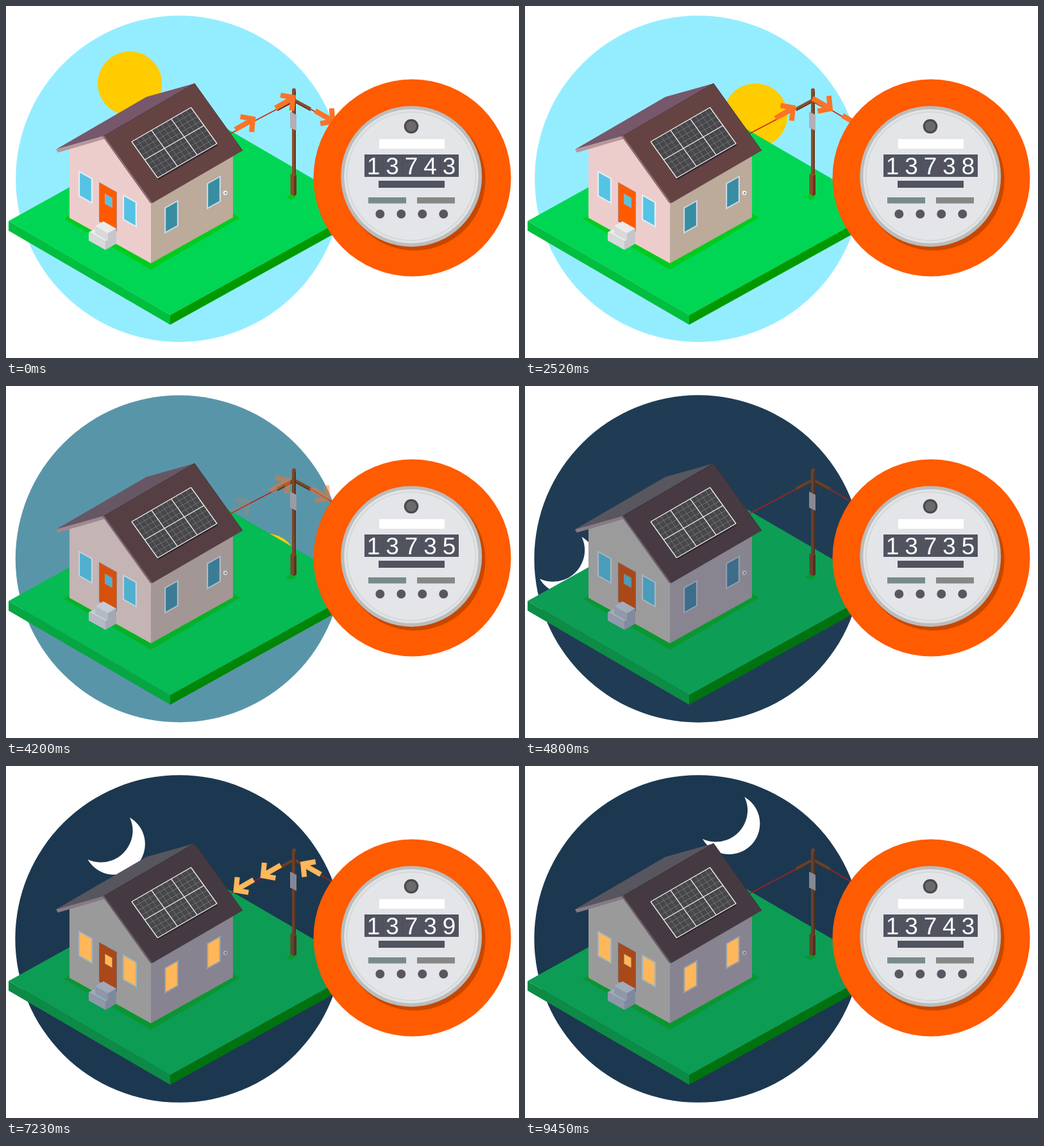
Write an HTML page with a canvas that moves like this. It is 800 by 550 pixels and loops after 9480 ms.

```html
<!DOCTYPE html>
<html lang="en">
<head>
<meta charset="utf-8">
<title>Solar home and meter</title>
<style>
html, body { margin: 0; width: 100%; height: 100%; overflow: hidden; background: #fff; }
canvas { display: block; width: 800px; height: 550px; }
</style>
</head>
<body>
<canvas id="stage" width="800" height="550"></canvas>
<script>
const ctx = document.getElementById('stage').getContext('2d');
const LOOP = 9480;
const RAD = Math.PI / 180;
const SLOPE = 0.56;            // fall of the slanted ground axes
let night = 0;
let lights = 0;

const clamp = v => Math.max(0, Math.min(1, v));
const ramp = (t, a, b) => clamp((t - a) / (b - a));
const mod = (a, b) => ((a % b) + b) % b;
const lerp = (a, b, k) => a + (b - a) * k;
const shift = ([x, y], dx, dy) => [x + dx, y + dy];

function mix(a, b, k) {
  const part = (h, i) => parseInt(h.slice(i, i + 2), 16);
  const rgb = [1, 3, 5].map(i => Math.round(lerp(part(a, i), part(b, i), k)));
  return '#' + rgb.map(v => v.toString(16).padStart(2, '0')).join('');
}
const tone = (day, dark) => mix(day, dark, night);

function trace(pts) {
  ctx.beginPath();
  pts.forEach(p => ctx.lineTo(...p));
}
function poly(color, ...pts) {
  trace(pts);
  ctx.fillStyle = color;
  ctx.fill();
}
function line(color, width, ...pts) {
  trace(pts);
  ctx.strokeStyle = color;
  ctx.lineWidth = width;
  ctx.stroke();
}
function disc(color, x, y, r) {
  ctx.beginPath();
  ctx.arc(x, y, r, 0, 7);
  ctx.fillStyle = color;
  ctx.fill();
}
function rect(color, x, y, w, h) {
  ctx.fillStyle = color;
  ctx.fillRect(x, y, w, h);
}

// Flat diamond from its front corner: a runs to the right, b to the left.
function slab(color, x, y, a, b, ka = SLOPE, kb = SLOPE) {
  poly(color, [x, y], [x + a, y - ka * a], [x + a - b, y - ka * a - kb * b], [x - b, y - kb * b]);
}
// Upright panel from its top left corner, falling by k to the right.
function face(color, x, y, w, h, k) {
  poly(color, [x, y], [x + w, y + k * w], [x + w, y + k * w + h], [x, y + h]);
}
function box(colors, x, y, a, b, h, ka = SLOPE, kb = SLOPE) {
  slab(colors[0], x, y - h, a, b, ka, kb);
  face(colors[1], x - b, y - h - kb * b, b, h, kb);
  face(colors[2], x, y - h, a, h, -ka);
}
function pane(frame, glass, x, y, w, h, k, m = 2.2) {
  face(frame, x, y, w, h, k);
  face(glass, x + m, y + m * (1 + k), w - 2 * m, h - 2 * m, k);
}

function sun(t) {
  const a = (-13.57 + 0.02403 * t) * RAD;
  disc('#ffcc00', 233.4 + 172.2 * Math.sin(a), 288.4 - 172.2 * Math.cos(a), 50);
}

function moon(t) {
  const u = 9450 - t;
  const a = (7.6 - 0.016622 * u - 4.97e-7 * u * u) * RAD;
  const x = 288.3 + 227 * Math.sin(a);
  const y = 315 - 227 * Math.cos(a);
  const tip = 46.3;            // half the distance between the tips
  const near = 12.4;
  const far = 17;
  const axis = Math.PI / 4;
  const half = Math.atan2(tip, -near);
  const cut = Math.atan2(tip, far);
  const off = (near + far) * Math.SQRT1_2;
  ctx.beginPath();
  ctx.arc(x, y, Math.hypot(tip, near), axis - half, axis + half);
  ctx.arc(x - off, y - off, Math.hypot(tip, far), axis + cut, axis - cut, true);
  ctx.fillStyle = '#ffffff';
  ctx.fill();
}

function ground() {
  const colors = [tone('#00d654', '#0d9c54'), tone('#00bf3e', '#0d8b46'), tone('#009a00', '#007210')];
  box(colors, 256, 498, 301, 252, 15, 0.556, 0.583);
  const shade = tone('#02cb1e', '#0a9630');
  slab(shade, 226, 412, 139, 136, 0.585, 0.585);
  slab(shade, 445, 303, 8, 8);
}

function power() {
  const wire = tone('#c9251c', '#a32020');
  const wood = tone('#8a4d2b', '#68412b');
  const dark = tone('#653719', '#4d3122');
  for (const side of [-1, 1]) {
    const top = [449, 147];
    const end = shift(top, 26 * side, 14);
    line(wire, 1.6, end, shift(end, 74 * side, side < 0 ? 39 : 44));
    line(wood, 5, top, end);
    line(dark, 1.5, shift(top, 0, 2.5), shift(end, 0, 2.5));
  }
  rect(wood, 446, 131, 6, 164);
  rect(dark, 450, 131, 2, 164);
  disc(wood, 449, 131.5, 3);
  box([wood, wood, dark], 449, 297, 4, 5.5, 31);
  face(tone('#b0b0b6', '#858894'), 443, 165, 10, 25, 0.5);
}

function solar() {
  const at = (u, v) => [196 + 92.5 * u + 40.5 * v, 212 - 53.5 * u + 56.5 * v];
  const grid = (color, width, cols, rows) => {
    for (let i = 0; i <= cols; i++) line(color, width, at(i / cols, 0), at(i / cols, 1));
    for (let i = 0; i <= rows; i++) line(color, width, at(0, i / rows), at(1, i / rows));
  };
  poly('#33262f', at(0, 1), at(1, 1), shift(at(1, 1), 1, 3), shift(at(0, 1), 1, 3));
  poly('#47464a', at(0, 0), at(1, 0), at(1, 1), at(0, 1));
  grid('#858585', 0.7, 12, 8);
  grid('#eeeeee', 1.3, 3, 2);
}

function roof() {
  const eave = [78, 224];
  const peak = [153, 203];
  const low = [228, 308];
  const back = p => shift(p, 141, -82);
  poly(tone('#77576a', '#57565e'), eave, peak, back(peak), back(eave));
  poly(tone('#b8979b', '#877987'), eave, peak, shift(peak, 0, 5), shift(eave, 3, 5));
  poly(tone('#8d6a72', '#6d5d6b'), shift(peak, -3, 0), peak, low, shift(low, -3, 0));
  poly(tone('#654343', '#463a42'), peak, back(peak), back(low), low);
  line(tone('#4f343a', '#393039'), 1, peak, back(peak), back(low));
}

function house() {
  const wall = tone('#edcdcc', '#9a9a9b');
  face(wall, 99, 219, 127, 112, SLOPE);
  poly(wall, [99, 220], [153, 203], [226, 304]);
  face(tone('#bcaa9a', '#878390'), 226, 306, 128, 96, -SLOPE);
  roof();
  solar();

  const glow = '#ffb759';
  const front = mix(tone('#55c3e3', '#4b9aba'), glow, lights);
  const side = mix(tone('#378da2', '#3e6b8a'), glow, lights);
  for (let i = 0; i < 2; i++) {
    pane(tone('#e4eff8', '#a3b4bf'), front, 113 + 69 * i, 257 + 37 * i, 22, 40, SLOPE);
    pane(tone('#ccd8e2', '#929eab'), side, 247 + 66 * i, 315 - 38 * i, 22, 41, -SLOPE);
  }
  pane(tone('#b7826c', '#766563'), tone('#ff5a00', '#a94818'), 145, 275, 28, 62, SLOPE, 1.2);
  pane(tone('#d99b7e', '#9c776a'), front, 154, 293, 12, 16, SLOPE, 0.7);

  const stone = [tone('#ebebeb', '#a2a9b9'), tone('#d9d9dc', '#8f98ab'), tone('#c6c6ca', '#7f899d')];
  box(stone, 155, 381, 17, 26, 13);
  box(stone, 159, 367, 13, 20, 12);
  disc(tone('#eeeeee', '#a5abb5'), 342, 292, 3.4);
  disc(tone('#777777', '#5b626d'), 342.6, 292.3, 1.3);
}

// s is the way along the wire, from the house over the pole to the meter.
function arrow(s, color, alpha, back) {
  const left = s < 112;
  const x = left ? 350 + s / 1.134 : 449 + (s - 112) / 1.154;
  const y = left ? 196 - s * 0.472 + (back ? 2 : 0) : 145 + (s - 112) * 0.5;
  ctx.save();
  ctx.globalAlpha = alpha;
  ctx.translate(x, y);
  ctx.scale(back ? -1 : 1, left !== back ? 1 : -1);
  ctx.beginPath();
  ctx.moveTo(-7, -11);
  ctx.lineTo(12.5, -7.5);
  ctx.lineTo(10.5, 13);
  ctx.moveTo(-15, 9);
  ctx.lineTo(11, -6);
  ctx.strokeStyle = color;
  ctx.lineWidth = 8;
  ctx.stroke();
  ctx.restore();
}

function flow(t) {
  const day = t < 4500;
  const fade = day ? 1 - ramp(t, 3900, 4500) : ramp(t, 4800, 5100) * (1 - ramp(t, 9000, 9300));
  const slow = 0.24 * ramp(t, 0, 1000) * (1 - ramp(t, 3650, 4200));
  const phase = day ? mod(25.5 + t * 0.0993, 71) : mod(36 - (t - 6000) * 0.0862, 71);
  for (let i = -1; i < 4; i++) {
    const s = phase + 71 * i;
    if (day) {
      arrow(s < 112 ? s : lerp(s, 112, slow), '#fb7327', fade * ramp(s, 14, 22), false);
    } else {
      arrow(s < 70 ? 24 + 46 * clamp(s / 70) ** 2.5 : s, '#ffb759', fade * ramp(s, -10, 0), true);
    }
  }
}

function reading(t) {
  return t < 4800 ? 13743 - Math.min(8, Math.floor(t / 480))
    : 13735 + Math.min(8, Math.floor((t - 4800) / 560));
}

function meter(t) {
  const slate = '#505461';
  disc('#ff5b00', 633.5, 268.5, 154);
  disc('#c64700', 637, 271.5, 110.5);
  disc('#bcbcbc', 632.2, 266.2, 110);
  disc('#d3d8d7', 632, 266, 105);
  disc('#e4e5e8', 632, 266, 104);
  disc('#d3d8d7', 632, 266, 101.5);
  disc('#e4e5e8', 632, 266, 99.5);

  disc('#4b4a50', 632, 188, 11.3);
  disc('#6b6969', 632, 188, 8);
  rect('#ffffff', 582, 208, 102, 15);
  rect(slate, 559, 232, 147, 35);
  rect(slate, 581, 273, 103, 11);
  rect('#788b8b', 565, 299, 59, 9.5);
  rect('#858885', 641, 299, 59, 9.5);
  for (let i = 0; i < 4; i++) {
    rect('#5b4b55', 587.5 + i * 29.8, 232, 1.2, 35);
    disc('#595561', 583.3 + i * 33, 325, 7);
  }
  ctx.fillStyle = '#ffffff';
  ctx.font = '37px "Liberation Sans", Arial, sans-serif';
  ctx.textAlign = 'center';
  [...String(reading(t))].forEach((d, i) => ctx.fillText(d, 573 + i * 29.5, 263));
}

function draw(t) {
  night = ramp(t, 3600, 4830);
  lights = ramp(t, 6450, 6800);
  rect('#ffffff', 0, 0, 800, 550);
  disc(tone('#94edff', '#1c3850'), 270.2, 270, 255 + 0.8 * night);
  if (t < 4900) sun(t);
  if (t > 4250) moon(t);
  ground();
  power();
  house();
  flow(t);
  meter(t);
}

const start = performance.now();
function tick() {
  draw((performance.now() - start) % LOOP);
  requestAnimationFrame(tick);
}
draw(0);
requestAnimationFrame(tick);
</script>
</body>
</html>
```
